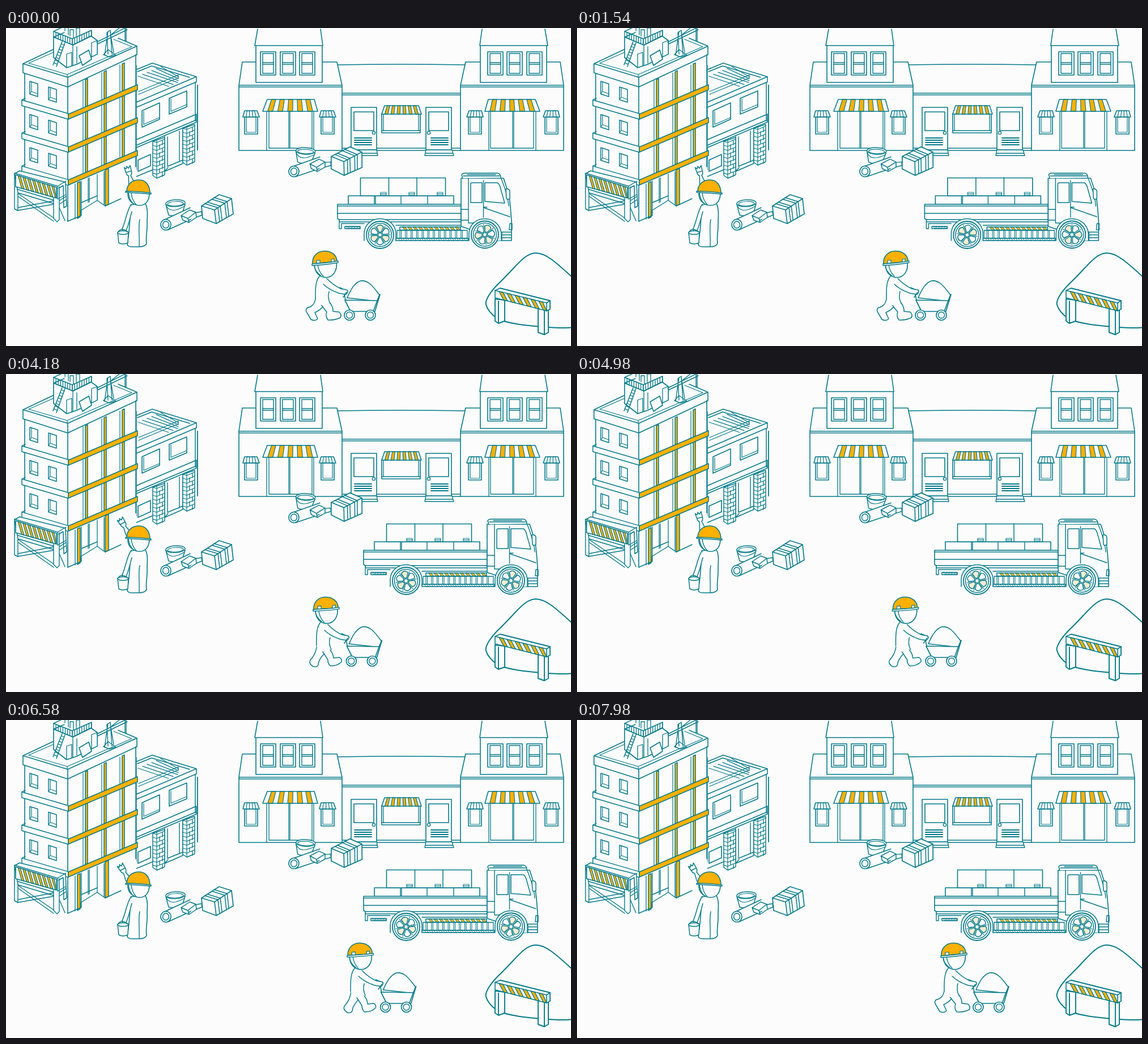
Animation, 997 px wide and 561 px high, one loop 8 s. Source, as an HTML page with a canvas:

```html
<!DOCTYPE html>
<html lang="en">
<head>
<meta charset="utf-8">
<title>Building site</title>
<style>
html, body { margin: 0; width: 100%; height: 100%; overflow: hidden; background: #fcfcfc; }
canvas { display: block; }
</style>
</head>
<body>
<canvas id="stage" width="997" height="561"></canvas>
<script>
const INK = '#067b8a', SUN = '#ffb000', BG = '#fcfcfc', CREAM = '#f6ecd2';
const LOOP = 8000;
const ctx = document.getElementById('stage').getContext('2d');

const clamp = (v, a, b) => Math.max(a, Math.min(b, v));
const mix = (a, b, t) => a + (b - a) * t;

function path(d, fill, width = 1.6) {
  const p = new Path2D(d);
  if (fill) { ctx.fillStyle = fill; ctx.fill(p); }
  if (width) { ctx.lineWidth = width; ctx.stroke(p); }
}
const rect = (x, y, w, h, fill, width) => path(`M${x} ${y}h${w}v${h}h${-w}Z`, fill, width);
function oval(x, y, rx, ry = rx, fill, width = 1.6, tilt = 0) {
  ctx.beginPath();
  ctx.ellipse(x, y, rx, ry, tilt, 0, Math.PI * 2);
  if (fill) { ctx.fillStyle = fill; ctx.fill(); }
  ctx.lineWidth = width;
  ctx.stroke();
}
function at(x, y, angle, draw) {
  ctx.save();
  ctx.translate(x, y);
  ctx.rotate(angle);
  draw();
  ctx.restore();
}

// Quad (top left, top right, bottom left, bottom right) cut into alternating stripes.
function stripes(a, b, c, d, n, skew = 0, fill = SUN, width = 1.2) {
  const top = t => `${mix(a[0], b[0], clamp(t, 0, 1))} ${mix(a[1], b[1], clamp(t, 0, 1))}`;
  const low = t => `${mix(c[0], d[0], clamp(t, 0, 1))} ${mix(c[1], d[1], clamp(t, 0, 1))}`;
  path(`M${a}L${b}L${d}L${c}Z`, BG, 0);
  for (let i = 1; i < n; i += 2) {
    const t = i / n, u = (i + 1) / n;
    path(`M${top(t)}L${top(u)}L${low(u + skew)}L${low(t + skew)}Z`, fill, width);
  }
  path(`M${a}L${b}L${d}L${c}Z`);
}

function roofDeck() {
  path('M30 63L109 87L231 32L198 18M30 63L85 37M30 63V79L109 104L231 47V32M109 87V104');
  path('M40 62L108 82L222 33L190 20M40 62L86 42M108 82V87', null, 1.2);
  // plant room
  path('M84 16V52L107 70L125 64L161 46V22L150 14L118 30Z', BG);
  path('M118 30V66M84 16L118 30M107 46V69M107 46L116 43V67M125 33V62', null, 1.3);
  path('M84 6L117 19L151 4M84 6L101 -2M84 16L103 8M118 30L151 14M151 4V14', null, 1.4);
  for (let i = 0; i <= 8; i++) {
    const x = 84 + i * 4.1, y = 6 + i * 1.6, u = 117 + i * 4.2;
    path(`M${x} ${y}V${y + 10}M${u} ${19 - i * 1.9}v10.5`, null, 1.3);
  }
  path('M104 5V-1H110V12M113 14V3H119V17M124 14V0H130V12', BG, 1.3);
  path('M99 24L83 65M104 26L89 68', null, 1.5);
  for (let i = 0; i < 8; i++) path(`M${98 - i * 1.9} ${28 + i * 4.8}l5 2`, null, 1.2);
  path('M129 49L146 39L151 55L135 66Z', BG);
  path('M151 26L161 22V46L151 51Z', BG, 1.3);
  // hoist
  path('M180 46L178 8L184 4L187 46M172 47L180 38L194 48L182 51ZM174 48L180 6M190 43L184 8', null, 1.4);
  path('M160 25L216 -3M162 28L214 3M185 12L200 0M210 0V23M212 0V24', null, 1.4);
}

function scaffold() {
  path('M15 257L24 252L105 272L107 314L102 317L101 278L92 283', BG, 1.5);
  path('M15 283L92 306L106 297M15 289L92 312L106 303', null, 1.4);
  path('M20 291L84 335M20 296L84 341M20 317L84 305M20 322L84 311M92 312L104 340', null, 1.4);
  path('M15 257V319L21 322V290ZM84 300V336L90 342L94 338V280', BG, 1.4);
  stripes([17, 259], [89, 281], [17, 280], [89, 300], 17, .09);
  path('M15 256L91 279L106 270M91 279V302L105 294', null, 1.4);
}

function tower() {
  const edge = (y, x) => y - (x - 110) * .426;
  path('M31 79L109 104L230 47V262L200 303L109 341L33 318Z', BG, 0);
  path('M33 80V256M109 104V341M229 47V245');
  roofDeck();
  const floors = [[104, 152], [161, 210], [219, 268]];
  for (const [y0, y1] of floors)
    for (const x of [140, 173, 205]) {
      const a = edge(y0, x), b = edge(y1, x);
      path(`M${x - 4} ${a + 2}V${b + 2}`, null, 1.2);
      path(`M${x} ${a}L${x + 4} ${a - 2}V${b - 2}L${x} ${b}Z`, SUN, 1.5);
    }
  for (let i = 0; i < 3; i++) {
    const y = 127 + i * 58.3, s = 152 + i * 58;
    path(`M28 ${y}L110 ${y + 24}V${y + 34}L28 ${y + 10}ZM28 ${y}l6 -3`, BG, 1.5);
    path(`M110 ${s}L232 ${s - 52}V${s - 43}L110 ${s + 9}Z`, SUN, 1.5);
    for (const [x, w] of [[42, 94], [75, 104]]) {
      const v = w + i * 58.5;
      path(`M${x} ${v}l14 4.5v22.5l-14 -4.5Z`, BG, 1.5);
      path(`M${x + 3} ${v + 1}v17l11 4M${x + 3} ${v + 18}l-3 4`, null, 1.2);
    }
  }
  // ground floor
  path('M126 273L131 271V333L126 336Z', SUN, 1.5);
  path('M175 250L181 248V311L175 314Z', SUN, 1.5);
  path('M122 275V337M133 270V331M145 265V308M147 264V307M161 258V304M173 253V312', null, 1.3);
  path('M109 341L132 331V322L161 304L175 314L203 301M133 308L161 296', null, 1.4);
  scaffold();
}

function annex() {
  path('M231 73L258 62L336 86V163L332 236L262 266L230 250Z', BG, 0);
  path('M231 73L258 62L336 86L230 131M336 86V95L230 140M334 96V164M230 66V250M232 77L257 67L324 87', null, 1.5);
  for (let i = 0; i < 6; i++) {
    const x = 233 + i * 8, y = 85 - i * 3.4;
    path(`M${x} ${y}L${Math.min(304, x + 54)} ${y + 18}`, null, 1.3);
  }
  path('M304 83V88L234 117M304 83L234 112', null, 1.3);
  path('M240 146L271 132V161L240 175ZM288 124L319 111V139L288 152Z', BG);
  path('M243 147V170L271 158M291 125V147L319 135', null, 1.2);
  path('M230 197L336 152M230 207L336 162M230 211L336 166M336 152V166', null, 1.5);
  path('M338 101V215', null, 1.8);
  path('M233 233L255 223V243L233 253Z');
  path('M280 191V253L312 239V178M285 192V244L312 233M306 182V236M280 253L286 246M230 262L259 250', null, 1.4);
  for (const [x, y] of [[259, 200], [312, 177]]) {
    path(`M${x} ${y}v60l7 5l14 -6v-66Z`, BG, 1.4);
    path(`M${x + 7} ${y - 2}v66`, null, 1.2);
    for (let i = 0; i < 9; i++) {
      const v = y + 7 * i;
      path(`M${x} ${v}l7 2l14 -6M${x + (i % 2 ? 12 : 17)} ${v - 1}v7`, null, 1.3);
    }
  }
}

function house() {
  path('M417 60H584L593 101H411ZM411 101V216H593V101M411 104H593', BG);
  path('M441 31V96H558V31M439 31H559M439 31L444 2M559 31L555 2', BG);
  for (const x of [449, 484, 518]) {
    rect(x, 42, 27, 41);
    rect(x + 4, 45, 19, 35, null, 1.4);
    path(`M${x + 4} 61h19M${x + 4} 64h19`, null, 1.3);
  }
  path('M460 148V216M464 148V212H540V148M543 148V216M499 148V212M501 148V212', null, 1.3);
  stripes([461, 126], [544, 126], [453, 147], [550, 147], 11);
  for (const x of [418, 553]) {
    rect(x + 3, 157, 23, 30, BG);
    rect(x + 6, 157, 17, 27, null, 1.2);
    stripes([x + 3, 146], [x + 25, 146], [x, 157], [x + 29, 157], 5, 0, BG);
  }
}

function door() {
  rect(609, 140, 45, 75, BG);
  rect(614, 148, 35, 33);
  for (const y of [194, 198, 202, 206]) path(`M615 ${y}H645`, null, 1.8);
  oval(649, 185, 2.6, 2.6, BG, 1.4);
  path('M608 215H654L656 225H605ZM606 221H655', BG, 1.4);
}

function street() {
  path('M584 65Q697 63 811 65M593 115H802M593 118H802M593 212H802M593 216H802', null, 1.5);
  const mirror = draw => {
    draw();
    ctx.save();
    ctx.translate(1395, 0);
    ctx.scale(-1, 1);
    draw();
    ctx.restore();
  };
  mirror(house);
  mirror(door);
  rect(663, 151, 68, 34, BG);
  path('M666 151V181H728V151M663 181H731', null, 1.3);
  stripes([668, 137], [728, 137], [663, 152], [733, 152], 13);
}

// Bucket, pipe, brick and crate; the origin is the near end of the pipe.
function supplies() {
  path('M0 -36L5 -17Q18 -13 29 -20L34 -36Z', BG, 1.5);
  oval(17, -38, 17, 6, BG, 1.5, -.06);
  oval(17, -37, 14, 4, null, 1.2, -.06);
  path('M1 -33Q9 -18 33 -33', null, 1.2);
  path('M-4 -8L43 -30L52 -15L4 9Z', BG, 0);
  path('M-4 -8L43 -30M4 9L50 -12', null, 1.6);
  oval(0, 0, 9, 9.5, BG, 1.7);
  oval(0, 0, 5.5, 6, null, 1.5);
  path('M46 -10L64 -17L63 -23L45 -20', BG, 1.4);
  path('M27 -16L42 -26L53 -22L39 -11ZM27 -16L30 -8L41 -4L39 -11M41 -4L54 -13L53 -22', BG, 1.5);
  path('M63 -33L94 -53L116 -46L119 -19L89 -2L65 -11Z', BG, 1.7);
  path('M63 -33L86 -26L116 -46M86 -26L89 -2', null, 1.6);
  for (const t of [.2, .34, .6, .74]) {
    const x = mix(86, 116, t), y = mix(-26, -46, t);
    path(`M${x - 23} ${y - 7}L${x} ${y}l3 ${mix(24, 27, t)}`, null, 1.5);
  }
}

function sandPile() {
  path('M1003 443C968 411 952 397 935 397C914 397 899 423 869 451C855 465 845 480 847 488C850 499 858 506 866 512C885 522 920 525 945 527S980 530 1003 528', null, 2);
  path('M863 478V517L869 521L880 517V480ZM869 482V521M939 494V537L950 541L957 537V495ZM950 497V541', BG, 1.9);
  path('M863 463L872 459L960 481V496L954 499', BG, 1.9);
  stripes([863, 463], [954, 485], [863, 476], [954, 499], 13, .09, SUN, 1.3);
  path('M954 485L960 481', null, 1.8);
}

const SWINGS = [[221, 272, -.24], [215, 280, -.5], [213, 284, -.82]];
function painter(pose) {
  const [x, y, a] = SWINGS[pose];
  path(`M${x - 4} ${y}L216 292H228L${x + 5} ${y - 1}Z`, BG, 1.5);
  at(x, y, a, () => path('M-5 2L-2 -12Q-5 -14 -5 -19L-6 -28L-3 -25L-1 -29L1 -25L5 -29L5 -19Q5 -14 2 -12L5 2M-5 -19H5', BG, 1.5));
  path('M221 312C218 326 220 350 214 379Q213 386 222 386L234 386Q246 386 248 380C246 368 250 358 249 340C250 326 250 314 244 307Z', BG);
  path('M236 338C233 352 236 368 235 385', null, 1.4);
  path('M221 311C213 322 211 342 205 354Q205 360 211 359C216 350 219 334 222 324', BG, 1.5);
  path('M197 361L199 379Q206 383 215 379L216 361Z', BG, 1.5);
  oval(206.5, 361, 9.5, 3.2, BG, 1.4);
  path('M197 361Q203 350 215 360', null, 1.3);
  path('M215 290C214 304 224 313 236 313C247 313 253 304 253 291Z', BG);
  path('M216 290Q217 304 226 311M221 291Q222 303 230 312', null, 1.4);
  path('M213 289C213 275 223 268 235 268C247 268 254 278 254 292Z', SUN);
  path('M211 288Q232 288 256 291V293Q232 291 211 290Z', BG, 1.4);
}

function wheel(x, y, spin) {
  oval(x, y, 24, 24, BG, 1.8);
  oval(x, y, 20.5, 20.5, null, 1.4);
  at(x, y, spin, () => {
    for (let i = 0; i < 6; i++) {
      ctx.rotate(Math.PI / 3);
      path('M-2 -5L-6 -14Q0 -21 6 -14L2 -5Z', i % 2 ? CREAM : BG, 1.4);
      path('M9 -16L5 -7', null, 1);
    }
    oval(0, 0, 3.5, 3.5, BG, 1.4);
  });
}

function truck(spin) {
  rect(604, 296, 186, 15, BG);
  path('M650 296V311M652 296V311M697 296V311M744 296V311', null, 1.4);
  rect(625.5, 264.5, 150, 31.5, BG);
  path('M675.5 264V296M725 264V296', null, 1.5);
  for (const x of [661, 711, 761]) {
    rect(x, 290, 10, 5, BG, 1.1);
    path(`M${x} 292.5h10`, null, 1.2);
  }
  path('M585 311H803V342H588V338L585 336Z', BG);
  path('M585 314H803M585 327H803M588 338H803M588 342V354H592V345H632M688 348H803M803 342H820', null, 1.4);
  stripes([598, 350], [625, 350], [598, 354], [625, 354], 11, .1, BG, 1);
  // cab
  path('M803 265H878C884 283 889 297 890 315L892 340V375H868L818 355L803 350Z', BG);
  path('M806 265L804 259Q805 256 810 256H867Q873 257 873 264M807 261H871M814 258.5H864', BG, 1.5);
  path('M820 275Q820 273 823 273H840V308H820ZM845 273H867Q871 275 873 284L880 309L845 306Z', BG, 1.5);
  path('M816 265V344M842.5 269V334M843 316H849M874 266Q886 296 887 314M803 320H816M843 317L889 333M816 344H828M803 339H816', null, 1.4);
  path('M882 284Q888 283 889 288V301Q884 304 883 300Z', BG, 1.5);
  path('M889 345H893V356H888ZM874 360H891M875 365H891M875 370H891M875 360V375', null, 1.4);
  // chassis
  stripes([695, 351], [802, 351], [695, 356.5], [802, 356.5], 23, .04, SUN, 1);
  rect(690, 357, 124, 14, BG, 1.3);
  for (let i = 0; i < 12; i++) path(`M${695 + i * 9.8} 357v14m2.5 -14v14`, null, 1.1);
  stripes([688, 371], [816, 371], [688, 375], [816, 375], 31, .03, BG, 1);
  path('M632 375V362C634 328 686 328 688 362V375', BG, 1.5);
  path('M817 375V362C819 328 870 328 874 362V375', BG, 1.5);
  wheel(660, 365, spin);
  wheel(845, 364.5, spin + .4);
}

const LEGS = [
  ['M546 478C544 490 537 492 531 494Q528 498 531 502L538 514Q545 518 550 513L545 502Q556 497 561 489',
   'M572 485Q578 494 577 500L588 501Q593 506 590 511Q580 516 568 515Q563 508 566 501Q560 494 556 488'],
  ['M547 478C545 492 541 498 535 505Q532 511 540 516Q547 518 549 513Q549 504 562 491',
   'M569 485Q576 494 576 501L587 500Q592 504 590 508Q583 515 571 515Q566 512 566 504Q561 496 557 490']
];
function hauler(stride) {
  const dx = stride * 1.5;
  ctx.save();
  ctx.translate(dx, 0);
  path('M602 476C608 462 615 449 626 446C638 445 645 452 659 471L655 482Z', BG);
  path('M598 480L655 481L660 470L651 500H608Z', BG, 1.7);
  path('M589 458L602 464L597 470L599 480M655 481L648 500', null, 1.6);
  for (const x of [606, 643]) {
    oval(x, 506.5, 9, 9, BG, 1.7);
    oval(x, 506.5, 5.5, 5.5, null, 1.4);
  }
  ctx.restore();
  const [back, front] = LEGS[stride];
  path(back, BG, 1.5);
  path(front, BG, 1.5);
  path('M554 437C545 446 546 464 546 479Q548 488 557 489L572 486Q567 476 570 462L567 440Z', BG, 0);
  path('M554 437C545 446 546 464 546 479M570 465Q567 476 572 486', null, 1.5);
  path('M566 442C574 450 582 456 591 460L602 462Q605 466 600 470L588 468C576 464 567 459 560 452', BG, 1.5);
  path('M601 466L595 475', null, 1.5);
  at(564, 416, stride * .03, () => {
    path('M-20 1C-19 17 -10 24 1 24C13 24 21 12 19 -3Z', BG);
    path('M-20 2Q-19 14 -8 21M-14 1Q-13 13 -4 22', null, 1.4);
    path('M-23 0C-24 -14 -14 -22.5 -2 -22.5C11 -22.5 20 -15 20 -4Z', SUN);
    path('M-24 0Q0 -1 22 -5V-2Q0 2 -24 3Z', BG, 1.4);
    path('M-16 -6L-10 -6.5V-1.5L-16 -1ZM10 -8L15 -9V-4L10 -3Z', BG, 1.2);
  });
}

// Truck travel as [step, distance]; the pace varies slightly.
const DRIVE = [[0, 0], [6, 13], [11, 23], [14, 28.4], [21, 46]];
function drive(n) {
  const i = Math.max(1, DRIVE.findIndex(k => k[0] >= n));
  const [a, x] = DRIVE[i - 1], [b, y] = DRIVE[i];
  return mix(x, y, (n - a) / (b - a));
}
const walk = n => n < 5 ? 1.5 * n + .36 * n * n : 16.5 + 5.7 * (n - 5);

function draw(t) {
  ctx.fillStyle = BG;
  ctx.fillRect(0, 0, 997, 561);
  ctx.strokeStyle = INK;
  ctx.lineJoin = ctx.lineCap = 'round';

  annex();
  tower();
  street();
  at(282, 347, 0, supplies);
  at(508, 253, .1, supplies);
  sandPile();

  const swing = Math.max(0, Math.floor((t - 4180) / 400) + 1);
  painter(swing % 3);

  const x = drive(clamp(Math.floor((t - 500) / 80) + 1, 0, 21));
  at(x, 0, 0, () => truck(x / 24));

  const n = clamp(Math.floor((t - 4180) / 200) + 1, 0, 20);
  at(walk(n), 0, 0, () => hauler(n % 2));
}

function tick() {
  draw(performance.now() % LOOP);
  requestAnimationFrame(tick);
}
tick();
</script>
</body>
</html>
```
